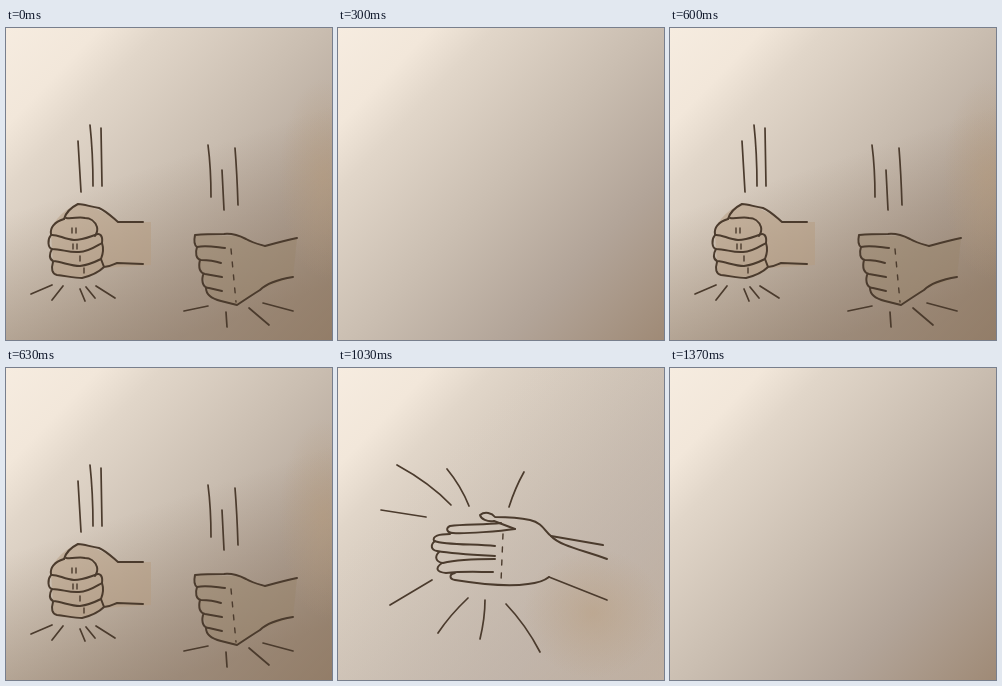
Write an HTML page that moves like this. It is 326 px wide and 312 px high and loops after 1.43 s.

```html
<!DOCTYPE html>
<html lang="en">
<head>
<meta charset="utf-8">
<title>Stomp, stomp, clap</title>
<style>
  html, body { margin: 0; width: 100%; height: 100%; overflow: hidden; background: #cdc1b4; }
  svg { display: block; width: 100vw; height: 100vh; }
  .ink { fill: none; stroke: #4b3b2d; stroke-width: 2; stroke-linecap: round; stroke-linejoin: round; }
  .thin { stroke-width: 1.7; }
  .dash { stroke-width: 1.4; stroke-dasharray: 5 8; }
  .skin { fill-opacity: .5; }
</style>
</head>
<body>
<svg viewBox="0 0 326 312" preserveAspectRatio="none">
  <defs>
    <linearGradient id="paper" gradientUnits="userSpaceOnUse" x1="0" y1="0" x2="326" y2="312">
      <stop offset="0" stop-color="#f6ece0"/>
      <stop offset=".15" stop-color="#f2e7da"/>
      <stop offset=".25" stop-color="#e1d6c9"/>
      <stop offset=".5" stop-color="#cabeb1"/>
      <stop offset=".75" stop-color="#b2a498"/>
      <stop offset="1" stop-color="#9f8a76"/>
    </linearGradient>
    <radialGradient id="tan">
      <stop offset="0" stop-color="#b89c7c" stop-opacity=".5"/>
      <stop offset="1" stop-color="#b89c7c" stop-opacity="0"/>
    </radialGradient>
    <linearGradient id="light" gradientUnits="userSpaceOnUse" x1="100" y1="80" x2="326" y2="312">
      <stop offset="0" stop-color="#e0d6cd" stop-opacity="0"/>
      <stop offset="1" stop-color="#e0d6cd" stop-opacity=".5"/>
    </linearGradient>
    <linearGradient id="shade" gradientUnits="userSpaceOnUse" x1="110" y1="150" x2="165" y2="312">
      <stop offset="0" stop-color="#86705a" stop-opacity="0"/>
      <stop offset="1" stop-color="#86705a" stop-opacity=".5"/>
    </linearGradient>
  </defs>
  <rect width="326" height="312" fill="url(#paper)"/>

  <g id="fists">
    <rect width="326" height="312" fill="url(#shade)"/>
    <ellipse cx="318" cy="150" rx="45" ry="100" fill="url(#tan)"/>
    <path class="skin" fill="#b59c80" d="M145 194H112C98 183 86 178 72 176C60 180 44 194 45 207L48 246C58 252 82 251 98 240L145 237Z"/>
    <path class="skin" fill="#9a866d" d="M291 210L259 218 234 208 189 207 193 235 204 270 231 277 254 262 287 249Z"/>
    <g class="ink">
      <path d="M137 194H112C105 188 100 183 93 180C85 179 78 176 72 176C66 179 60 184 58 191"/>
      <path d="M60 190C68 191 73 188 79 190C84 190 89 193 91 199C92 203 91 205 89 208M58 191C48 194 44 200 45 206"/>
      <path d="M45 207C51 206 58 211 68 212C77 212 83 209 89 207C94 204 97 208 96 215"/>
      <path d="M45 207C41 212 42 220 46 221C56 221 63 225 73 224C82 224 89 219 96 215C98 221 97 226 95 231"/>
      <path d="M46 221C43 226 43 231 47 233C57 234 64 238 74 238C82 237 89 234 95 231"/>
      <path d="M47 234C45 241 46 246 51 247C60 248 69 250 76 250C84 248 92 245 98 239L95 231M98 239C104 239 108 236 111 235L137 236"/>
      <path d="M189 207C200 206 209 206 218 206C227 205 234 208 240 211C247 215 252 216 259 218C270 215 281 212 291 210M189 207C188 212 188 217 191 219C200 217 209 219 219 220"/>
      <path d="M191 219C189 225 190 231 195 232C202 232 209 233 215 235M194 232C192 240 194 245 199 246L216 249M197 247C195 255 198 260 203 260L216 263"/>
      <path d="M200 260C200 268 207 271 215 273L231 277C240 271 246 267 254 262C261 255 275 251 287 249"/>
      <path class="dash" d="M66 200V212M70 200V212M67 216V226M71 216V226M74 228V236M78 240V246"/>
      <path class="dash" d="M225 221L230 274"/>
      <path class="thin" d="M72 113L75 164M84 97Q87 125 87 158M95 100L96 158M202 117Q205 140 205 169M216 142L218 182M229 120Q231 145 232 177"/>
      <path class="thin" d="M46 257L25 266M57 258L46 272M74 261L79 273M80 259L89 270M90 258L109 270"/>
      <path class="thin" d="M202 278L178 283M220 284L221 299M243 280L263 297M257 275L287 283"/>
    </g>
  </g>

  <g id="clap">
    <rect width="326" height="312" fill="url(#light)"/>
    <ellipse cx="255" cy="245" rx="70" ry="65" fill="url(#tan)"/>
    <g class="ink">
      <path d="M177 161L156 153C149 154 143 151 142 147C147 143 154 145 157 149C170 149 183 150 192 152C205 155 207 164 213 168L265 177"/>
      <path d="M213 168C222 178 245 182 269 191"/>
      <path d="M177 161C163 163 127 166 115 165C109 165 107 160 112 158C125 156 147 157 163 155"/>
      <path d="M112 166C101 166 94 168 96 173C107 177 136 176 157 178"/>
      <path d="M97 173C92 177 93 182 99 183C116 186 138 187 157 188"/>
      <path d="M101 184C96 189 98 194 105 195C121 191 140 191 157 191"/>
      <path d="M104 195C97 200 98 204 108 205M117 205C111 206 111 211 117 212C142 216 170 219 190 216C200 215 206 213 211 209M108 205C125 203 140 204 155 204"/>
      <path class="thin" d="M211 209L269 232"/>
      <path class="dash" d="M165 166L163 214"/>
      <path class="thin" d="M59 97Q92 115 113 137M109 101Q123 118 131 138M186 104Q177 120 171 139M43 142L88 149M52 237L94 212M100 265Q112 247 130 230M142 271Q147 250 147 232M168 236Q188 257 202 284"/>
    </g>
  </g>
</svg>
<script>
  const LOOP = 1430;
  const fists = document.getElementById("fists");
  const clap = document.getElementById("clap");
  const start = performance.now();

  const show = (part, visible) => part.setAttribute("visibility", visible ? "visible" : "hidden");

  function draw(now) {
    const t = Math.max(0, now - start) % LOOP;
    show(fists, t < 270 || (t >= 330 && t < 635));
    show(clap, t >= 635 && t < 1365);
    requestAnimationFrame(draw);
  }
  draw(start);
</script>
</body>
</html>
```
